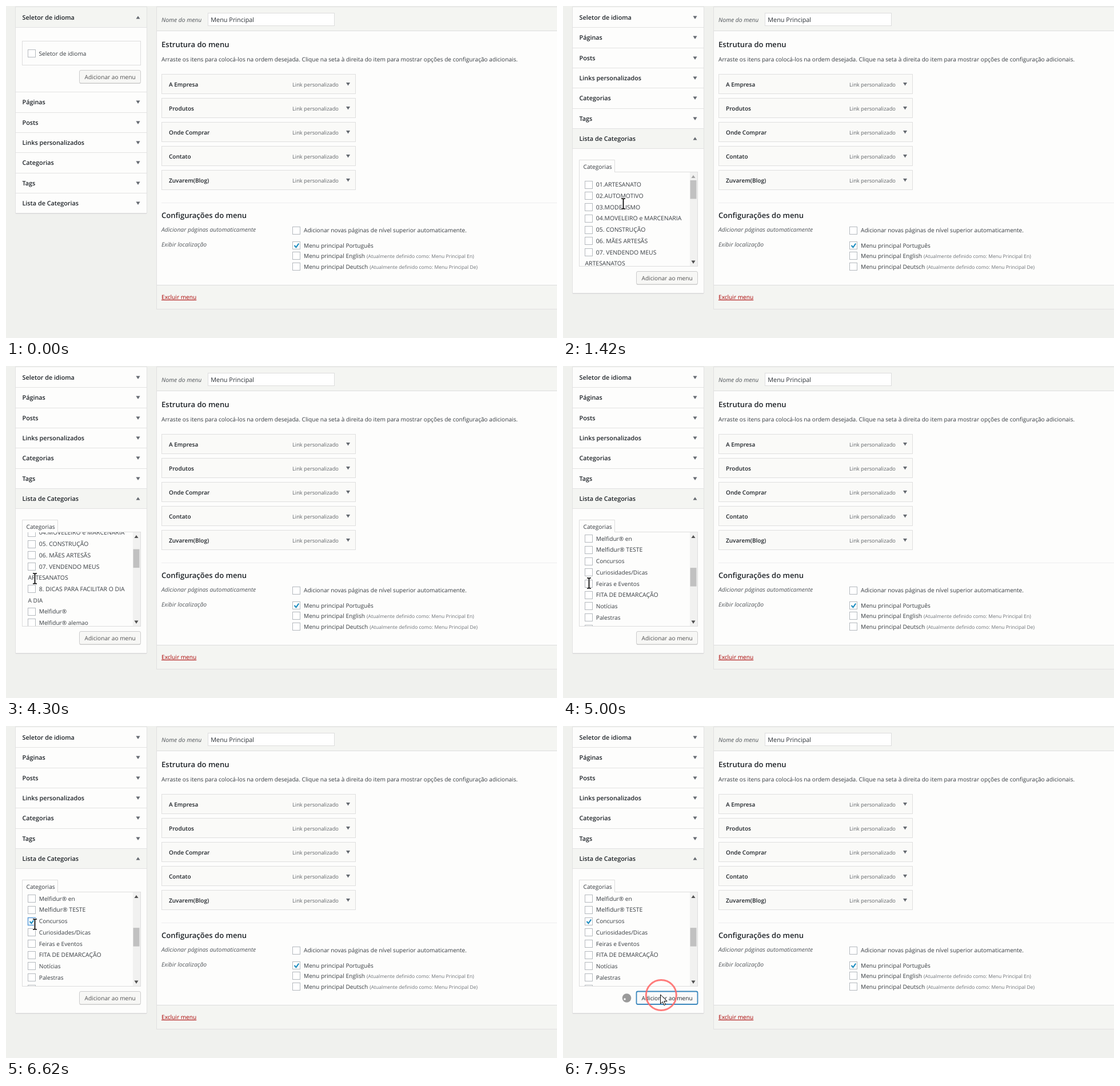
Write an HTML page that moves like this. It is 964 px wide and 581 px high and loops after 8 s.

```html
<!DOCTYPE html>
<html lang="pt-BR">
<head>
<meta charset="utf-8">
<title>Menus</title>
<style>
html, body { margin: 0; width: 100%; height: 100%; overflow: hidden; background: #f0f1ee; }
#stage { display: block; }
text { font: 10.14px "Open Sans", "Noto Sans", sans-serif; fill: #363b40; text-rendering: geometricPrecision; white-space: pre; }
.title { font-size: 10.8px; font-weight: 600; fill: #1d2227; }
.item { font-size: 10.03px; font-weight: 600; fill: #1d2227; }
.head { font-size: 13.05px; font-weight: 600; fill: #1d2227; }
.caps { font-size: 10.45px; }
.kind { font-size: 9.25px; fill: #606468; }
.note { font-size: 8.57px; fill: #6c7176; }
.label { font-size: 10.33px; font-style: italic; fill: #50555a; }
.field { font-size: 10.87px; fill: #2c3136; }
.button { fill: #505050; }
.focus + .button { fill: #23282d; }
.delete { fill: #a00; text-decoration: underline; }
</style>
</head>
<body>
<svg id="stage" width="964" height="581" viewBox="0 0 964 581"></svg>
<script>
const LOOP = 8000, ROW = 35.3, TOP = 2, PITCH = 19.7;
const WHITE = '#fdfdfc', BAR = '#f4f5f2', MARK = '#646970';
const stage = document.getElementById('stage');

// Baselines and box edges sit on whole pixels.
const text = (x, mid, str, cls = '') => `<text x="${x}" y="${Math.round(mid + 3.8)}" class="${cls}">${str}</text>`;
const rect = (x, y, w, h, fill, stroke = 'none', more = '') =>
  `<rect x="${x}" y="${y}" width="${w}" height="${h}" fill="${fill}" stroke="${stroke}" ${more}/>`;
const line = (x1, y, x2, color) => `<path d="M${x1} ${y}H${x2}" stroke="${color}"/>`;
const down = (x, y, more = '') => `<path d="M${x - 3.5} ${y - 2.5}h7l-3.5 5.5z" fill="${MARK}" ${more}/>`;
const up = (x, y, more = '') => `<path d="M${x - 3.5} ${y + 2.5}h7l-3.5 -5z" fill="${MARK}" ${more}/>`;
const boxTop = mid => Math.round(mid - 6.8) + .5;
const box = (x, mid, more = '') => rect(x, boxTop(mid), 13, 13, '#fff', '#b4b9be', more);
const tick = (x, mid, more = '') =>
  `<path d="M${x + 3} ${boxTop(mid) + 6.5}l3 3.3l4.7 -6.6" fill="none" stroke="#1e8cbe" stroke-width="2.1" ${more}/>`;
const button = (y, id) =>
  rect(128.5, y + 1, 107, 22.5, '#ccc', 'none', 'rx="2.5"') +
  rect(128.5, y, 107, 22.5, '#f7f7f5', '#ccc', `rx="2.5" id="${id}"`) +
  text(137.5, y + 11.5, 'Adicionar ao menu', 'button');

const titles = ['Seletor de idioma', 'Páginas', 'Posts', 'Links personalizados', 'Categorias', 'Tags', 'Lista de Categorias'];
// A leading "+" marks the wrapped second line of an entry.
const entries = ['01.ARTESANATO', '02.AUTOMOTIVO', '03.MODELISMO', '04.MOVELEIRO e MARCENARIA',
  '05. CONSTRUÇÃO', '06. MÃES ARTESÃS', '07. VENDENDO MEUS', '+ARTESANATOS',
  '8. DICAS PARA FACILITAR O DIA', '+A DIA', 'Melfidur®', 'Melfidur® alemao', 'Melfidur® en',
  'Melfidur® TESTE', 'Concursos', 'Curiosidades/Dicas', 'Feiras e Eventos',
  'FITA DE DEMARCAÇÃO', 'Notícias', 'Palestras', ''];
const menu = ['A Empresa', 'Produtos', 'Onde Comprar', 'Contato', 'Zuvarem(Blog)'];
const PICK = entries.indexOf('Concursos');

const entry = (str, i) => {
  const mid = 21.5 + i * PITCH, cls = /[A-Z]{5}/.test(str) ? 'caps' : '';
  if (str[0] === '+') return text(10.5, mid, str.slice(1), cls);
  const picked = i === PICK;
  return box(10.5, mid, picked ? 'id="pick"' : '') + (picked ? tick(10.5, mid, 'id="tick"') : '') + text(29.8, mid, str, cls);
};

// Panel contents are placed relative to the panel's top edge.
const panel = (id, content) => `<svg id="${id}" x="0" y="35" width="260">${line(17, .5, 246, '#e2e2e2')}${content}</svg>`;
const languagePanel = panel('panel0',
  rect(28.5, 24.5, 207, 42, WHITE, '#ddd') + box(38.5, 46) + text(57.5, 46, 'Seletor de idioma') + button(75.5, 'add0'));
const categoryPanel = panel('panel6',
  rect(28.5, 41.5, 207, 165, WHITE, '#ddd') +
  `<path d="M28.5 42V20.5H90.5V42" fill="${WHITE}" stroke="#ddd"/>` + text(35.5, 32, 'Categorias') +
  `<svg x="28" y="42" width="193" height="164"><g id="list">${entries.map(entry).join('')}</g></svg>` +
  rect(222, 42, 13, 164, '#f1f1f0') + rect(222.5, 0, 11, 32.5, '#c1c1c1', 'none', 'id="thumb"') +
  up(228, 49.5, 'id="scrollUp"') + down(228, 199, 'style="fill:#505050"') +
  button(215.5, 'add6') +
  '<g id="spinner"><circle cx="111.5" cy="227" r="7.8" fill="#9a9a9a"/><circle cx="108" cy="229" r="1.7" fill="#fff"/></g>');

const accordion = rect(17, 503, 229, 1, '#ddd', 'none', 'id="shade"') +
  rect(16.5, 1.5, 230, 0, WHITE, '#e2e2e2', 'id="side"') +
  titles.map((name, i) => `<g id="row${i}">` +
    rect(17, 0, 229, 35.5, BAR, 'none', `id="fill${i}"`) +
    (i ? line(17, .5, 246, '#e2e2e2') : '') + text(28.5, 18, name, 'title') +
    down(231, 18, `id="down${i}"`) + up(231, 18, `id="up${i}"`) +
    (i === 0 ? languagePanel : i === 6 ? categoryPanel : '') + '</g>').join('');

const option = (mid, str, note) => box(501.5, mid) +
  text(521, mid, str + (note ? `<tspan class="note" dx="3">(Atualmente definido como: ${note})</tspan>` : ''));

const editor = rect(263.5, 1.5, 720, 529, WHITE, '#e0e0e0') +
  rect(264, 2, 700, 41, BAR) + line(264, 43.5, 964, '#ddd') +
  rect(264, 489, 700, 41, BAR) + line(264, 488.5, 964, '#ddd') +
  text(272, 24, 'Nome do menu', 'label') +
  rect(353.5, 12.5, 221, 22, '#fff', '#ddd') + text(358.3, 24, 'Menu Principal', 'field') +
  text(272, 68, 'Estrutura do menu', 'head') +
  text(272, 93.3, 'Arraste os itens para colocá-los na ordem desejada. Clique na seta à direita do item para mostrar opções de configuração adicionais.') +
  menu.map((name, i) => {
    const y = Math.round(119 + 41.9 * i) + .5;
    return rect(272.5, y, 339, 34, '#fafaf8', '#dfdfdf') + text(285, y + 17.5, name, 'item') +
      text(501, y + 17.3, 'Link personalizado', 'kind') + down(598.5, y + 17);
  }).join('') +
  line(272, 344.5, 964, '#eee') +
  text(272, 367, 'Configurações do menu', 'head') +
  text(272, 391.5, 'Adicionar páginas automaticamente', 'label') +
  option(392.5, 'Adicionar novas páginas de nível superior automaticamente.') +
  text(272, 417.6, 'Exibir localização', 'label') +
  option(419, 'Menu principal Português') + tick(501.5, 419) +
  option(437, 'Menu principal English', 'Menu Principal En') +
  option(456, 'Menu principal Deutsch', 'Menu Principal De') +
  text(272, 509, 'Excluir menu', 'delete');

const pointer = '<circle id="ring" r="26.5" fill="none" stroke="#f66" stroke-opacity=".85" stroke-width="3"/>' +
  '<g id="pointer"><path id="arrow" d="M0 0V16L3.7 12.6L6.3 18.6L8.9 17.5L6.3 11.6H11.5Z" fill="#fff" stroke="#000"/>' +
  '<g id="beam" fill="none"><path d="M-3.5 -9H3.5M0 -9V9M-3.5 9H3.5" stroke="#fff" stroke-width="3.5"/>' +
  '<path d="M-3.5 -9H-1L0 -8L1 -9H3.5M0 -8V8M-3.5 9H-1L0 8L1 9H3.5" stroke="#000" stroke-width="1.7"/></g></g>';

stage.innerHTML = accordion + editor + pointer;
const el = {};
for (const node of stage.querySelectorAll('[id]')) el[node.id] = node;

const set = (id, attrs) => { for (const k in attrs) el[id].setAttribute(k, attrs[k]); };
const show = (id, on) => set(id, { visibility: on ? 'inherit' : 'hidden' });
const swing = p => .5 - Math.cos(Math.PI * Math.min(1, Math.max(0, p))) / 2;

// Each key is [time, value, ...]; the values ease from one key to the next.
function track(keys, t) {
  const i = keys.findIndex(k => k[0] > t);
  if (i === 0) return keys[0].slice(1);
  if (i < 0) return keys[keys.length - 1].slice(1);
  const a = keys[i - 1], b = keys[i], e = swing((t - a[0]) / (b[0] - a[0]));
  return a.slice(1).map((v, j) => v + (b[j + 1] - v) * e);
}
const path = [[20, 150, 590], [770, 107, 348], [930, 107, 348], [950, 105.5, 346], [1960, 105.5, 346],
  [2650, 50.5, 353], [3690, 50.5, 353], [3980, 50.5, 372], [4730, 50.5, 372], [5000, 45.5, 380],
  [5520, 46, 352], [5700, 45, 344], [6220, 45, 344], [6620, 50.5, 347], [7020, 62, 362], [7650, 170.5, 470]];
const scrolling = [[3240, 0], [3530, 80], [4300, 80], [4590, 164], [4730, 164], [4960, 247]];
const within = (t, a, b) => t >= a && t < b;

function draw(t) {
  const [x, y] = track(path, t), scroll = Math.round(track(scrolling, t)[0]);
  const e = swing((t - 1180) / 220), opened = t >= 1180;
  const h0 = 113 * (1 - e), h6 = 253 * e;

  titles.forEach((_, i) => {
    const rowY = Math.round(TOP + ROW * i + (i ? h0 : 0));
    const open = i === (opened ? 6 : 0);
    const hover = t >= 20 && within(y, rowY, rowY + ROW) && within(x, 17, 246);
    set('row' + i, { transform: `translate(0 ${rowY})` });
    show('fill' + i, open || hover);
    show('up' + i, open);
    show('down' + i, !open);
    for (const side of ['up', 'down']) set(side + i, { fill: hover ? '#000' : MARK });
  });
  set('panel0', { height: h0 });
  set('panel6', { height: h6 });
  const height = Math.round(ROW * 7 + h0 + h6);
  set('side', { height: height + 1 });
  set('shade', { y: TOP + height + 1 });

  set('list', { transform: `translate(0 ${-scroll})` });
  set('thumb', { y: 56 + scroll * .195 });
  set('scrollUp', { fill: scroll > 0 ? '#505050' : '#a3a3a3' });

  const checked = t >= 6000, focus = t >= 7920;
  show('tick', checked);
  set('pick', { stroke: checked && !focus ? '#5b9dd9' : '#b4b9be', 'stroke-width': checked && !focus ? 1.5 : 1 });
  const overAdd = x > 128 && y > 465;
  set('add6', {
    class: overAdd || focus ? 'focus' : '', fill: overAdd ? '#fafafa' : '#f7f7f5',
    stroke: focus ? '#3a87bd' : overAdd ? '#999' : '#ccc', 'stroke-width': focus ? 1.8 : 1
  });
  show('spinner', t >= 7950);

  const beam = t >= 1400 && y < 457;
  show('pointer', t >= 20);
  show('beam', beam);
  show('arrow', !beam);
  set('pointer', { transform: `translate(${x} ${y})` });
  show('ring', within(t, 1160, 1400) || within(t, 5980, 6220) || focus);
  set('ring', { cx: x + 1.3, cy: y + 1 });
}

function frame() {
  draw(performance.now() % LOOP);
  requestAnimationFrame(frame);
}
frame();
</script>
</body>
</html>
```
